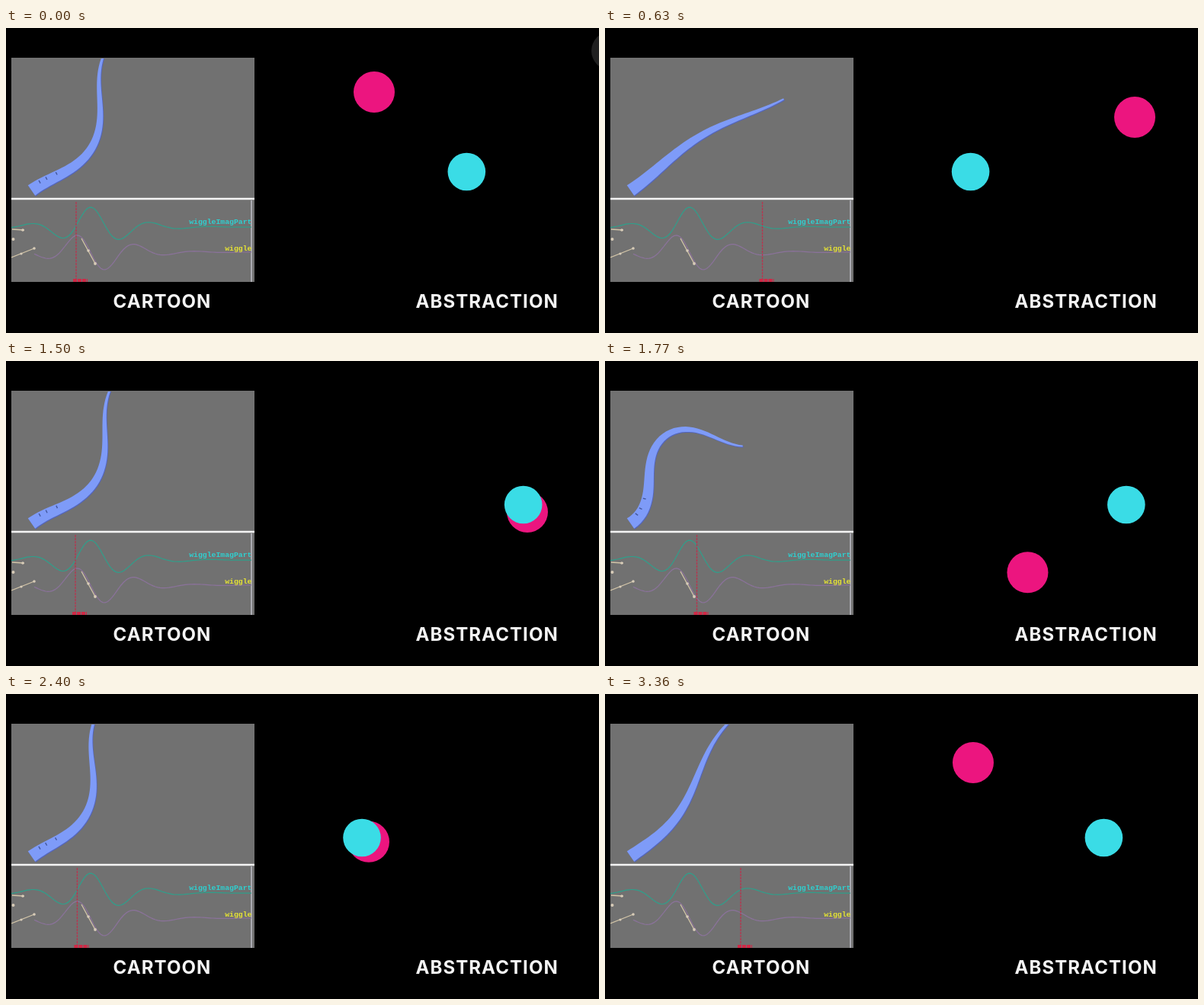
Write an HTML page that moves like this. It is 778 by 400 pixels and loops after 3.51 s.

```html
<!DOCTYPE html>
<html lang="en">
<head>
<meta charset="utf-8">
<title>Cartoon and abstraction</title>
<style>
  html, body { margin: 0; width: 100%; height: 100%; overflow: hidden; background: #000; }
  svg { display: block; width: 778px; height: 400px; }
  .caption { font: 700 24px Inter, sans-serif; letter-spacing: 1.1px; fill: #f4f4f4; }
  .label { font: bold 9.8px "Liberation Mono", monospace; text-anchor: end; }
  .curve { fill: none; stroke-width: 1.2; }
  .handle { fill: none; stroke: #d2c5a8; stroke-width: 1.3; }
  .ball { filter: blur(.6px); }
</style>
</head>
<body>
<svg viewBox="0 0 778 400">
  <defs>
    <clipPath id="panel"><rect x="7" y="39" width="319" height="294"/></clipPath>
    <clipPath id="view"><rect x="7" y="40" width="318" height="183"/></clipPath>
  </defs>
  <rect width="778" height="400"/>
  <g clip-path="url(#panel)">
    <rect x="7" y="39" width="319" height="294" fill="#717171"/>
    <path d="M322 226V333" stroke="#b9b9c2" stroke-width="1.6"/>
    <path id="teal" class="curve" stroke="#2f9f8b"/>
    <path id="purple" class="curve" stroke="#8b729b"/>
    <path class="handle" d="M8 264L24 265M7 301L37 289M99 276L117 309"/>
    <g fill="#d8ccb8">
      <circle cx="9.5" cy="277" r="2"/>
      <circle cx="22" cy="265" r="1.8"/>
      <circle cx="20" cy="296" r="1.6"/>
      <circle cx="37" cy="289" r="1.8"/>
      <circle cx="108" cy="292" r="1.8"/>
      <circle cx="117" cy="309" r="1.9"/>
    </g>
    <g id="head">
      <path d="M0 228V333" stroke="#b8344f" stroke-width="1.3" stroke-dasharray="3 1"/>
      <path d="M-4 331H15" stroke="#d02846" stroke-width="4" stroke-dasharray="5 1"/>
    </g>
    <text class="label" x="322.5" y="257" fill="#2fd0d0">wiggleImagPart</text>
    <text class="label" x="322.5" y="292" fill="#e6e334">wiggle</text>
    <g clip-path="url(#view)">
      <path id="shade" fill="#5365bd" transform="translate(.8 1)"/>
      <path id="tail" fill="#7e9bf8"/>
      <path id="ticks" stroke="#354787" stroke-width="1.4"/>
    </g>
    <path d="M7 224H326" stroke="#f5f5f5" stroke-width="2.4"/>
  </g>
  <text class="caption" x="140.5" y="367">CARTOON</text>
  <text class="caption" x="537.5" y="367">ABSTRACTION</text>
  <circle id="pink" class="ball" r="27" fill="#ec157f"/>
  <circle id="cyan" class="ball" r="24.8" fill="#3adce6"/>
  <circle id="corner" cx="793" cy="30" r="25" fill="#202020"/>
</svg>
<script>
const LOOP = 3510, STEP = 30, RAD = Math.PI / 180;
const $ = id => document.getElementById(id);

// time, pink x, pink y, cyan swing in degrees, playhead travel
const stops = [
  [0, 483, 84, 10, 92],
  [330, 699, 92, 156, 162],
  [990, 688, 157, 326, 237],
  [1500, 684, 198, 414, 241],
  [1980, 467, 321, 535, 307],
  [2790, 484, 80, 700, 455],
  [3360, 483, 90, 757, 478]
];

// Monotone cubic interpolation, clamped at the end.
function track(keys, at) {
  const last = keys.length - 1;
  if (at >= keys[last][0]) return keys[last].slice(1);
  const i = keys.findIndex(k => k[0] > at) - 1;
  const a = keys[i], b = keys[i + 1], h = b[0] - a[0], u = (at - a[0]) / h, w = 1 - u;
  const rate = (n, c) => (keys[n + 1][c] - keys[n][c]) / (keys[n + 1][0] - keys[n][0]);
  const slope = (n, c) => {
    const p = rate(Math.max(n - 1, 0), c), q = rate(Math.min(n, last - 1), c);
    return p * q > 0 ? 2 * p * q / (p + q) : 0;
  };
  return a.slice(1).map((v, n) => {
    const c = n + 1;
    return v * w * w * (1 + 2 * u) + b[c] * u * u * (3 - 2 * u)
      + h * u * w * (w * slope(i, c) - u * slope(i + 1, c));
  });
}

// Complex wiggle: a wave packet centred at x = 111.
function wiggle(x) {
  const d = x - 111, env = 1 / Math.cosh(d / (d < 0 ? 32 : 37)), phase = d / 80 * 2 * Math.PI;
  return { imag: env * Math.cos(phase), real: -env * Math.sin(phase) };
}

function plot(id, from, mid, part) {
  const pts = [];
  for (let x = from; x <= 322; x += 3) pts.push(`${x} ${(mid - 26 * wiggle(x)[part]).toFixed(1)}`);
  $(id).setAttribute("d", "M" + pts.join("L"));
}

// The wiggle bends the tail with a wave running along its length.
function drawTail(head) {
  const { imag, real } = wiggle(head - 8.5), n = 48, top = [], low = [];
  let x = 33.5, y = 213, ticks = "";
  for (let i = 0; i <= n; i++) {
    const s = i / n, k = 5.6 * s;
    const angle = RAD * (35 + 56 * imag * Math.sin(k) + 42 * real * (1 - Math.cos(k)));
    const cos = Math.cos(angle), sin = Math.sin(angle), half = 8.2 - 7.2 * s;
    const off = r => `${(x - sin * half * r).toFixed(2)} ${(y - cos * half * r).toFixed(2)}`;
    top.push(off(1));
    low.unshift(off(-1));
    if (i === 3 || i === 5 || i === 8) ticks += `M${off(.75)}L${off(.2)}`;
    x += cos * 236 / n;
    y -= sin * 236 / n;
  }
  const d = "M" + top.concat(low).join("L") + "Z";
  $("tail").setAttribute("d", d);
  $("shade").setAttribute("d", d);
  $("ticks").setAttribute("d", ticks);
  $("ticks").setAttribute("opacity", head < 172 ? .8 : 0);
}

function place(id, x, y) {
  $(id).setAttribute("transform", `translate(${x} ${y})`);
}

function draw(now) {
  const t = Math.floor(now % LOOP / STEP) * STEP;
  const [px, py, swing, travel] = track(stops, t);
  const head = 90 + (travel - 90) % 150;
  place("pink", px, py);
  place("cyan", 584 + 117 * Math.sin(swing * RAD), 188.5);
  place("head", head, 0);
  drawTail(head);
  $("corner").setAttribute("opacity", t < STEP ? 1 : 0);
}

plot("teal", 7, 261, "imag");
plot("purple", 37, 294, "real");

const start = performance.now();
function loop() {
  draw(performance.now() - start);
  requestAnimationFrame(loop);
}
loop();
</script>
</body>
</html>
```
